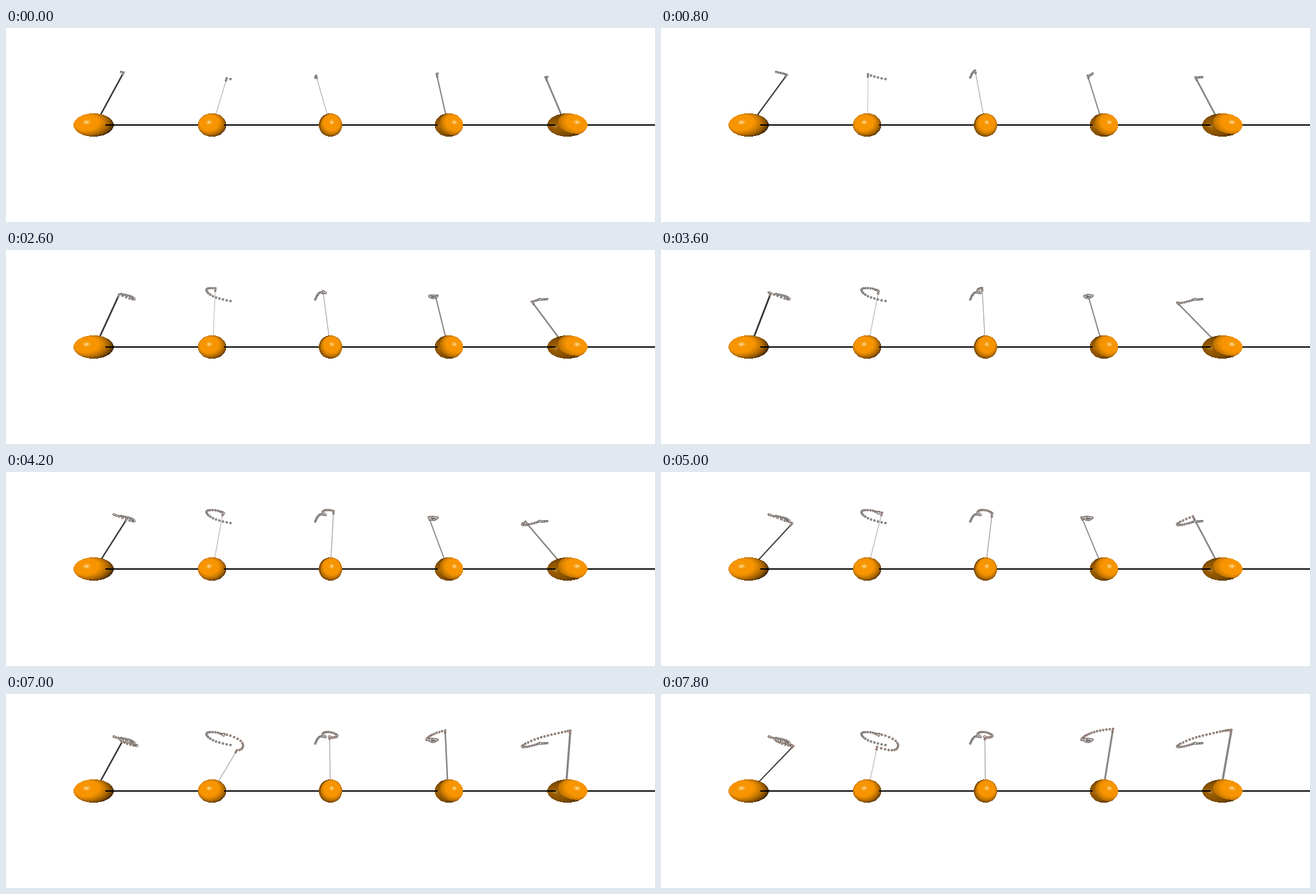
A matplotlib script for the animation above (8 s loop, 1000x300 px).

```python
import numpy as np
import matplotlib.pyplot as plt
from matplotlib.animation import FuncAnimation

W, H, DPI = 1000, 300, 100
FRAMES, INTERVAL = 40, 200
PX = 72 / DPI
MID, RADIUS, GAP = 150, 18, 182.5
STRIDE = 5  # steps between two waypoints of a tip

# tip waypoints, shaft colour, shaft width at the leftmost and rightmost tip
ARROWS = [
    ([(177.5, 68), (194, 72.5), (194.5, 76), (170, 67.3), (173.5, 68.2),
      (201.5, 79), (187, 77), (177.5, 70.5), (204, 80.5)], "#383838", (2.8, 1.8)),
    ([(346, 79), (319, 71.5), (309.5, 60.5), (326.5, 60), (335.5, 64),
      (336.5, 62), (361.5, 72.5), (360, 86.5), (333, 82)], "#b4b4b4", (.7, 1.6)),
    ([(476.5, 76.5), (484, 66), (492.5, 66.5), (488, 62.3), (498, 58.8),
      (510.5, 64.5), (502, 67.5), (498.5, 65.8), (499, 66.5)], "#999999", (.9, 1.2)),
    ([(665, 70.5), (657.5, 74), (653, 70.8), (663, 70.8), (655.5, 69.5),
      (648.3, 70.8), (653.5, 65), (672, 57.5), (696.5, 54)], "#858585", (1.6, 2.8)),
    ([(834, 76), (823.5, 76.5), (822, 76.2), (806.5, 81), (795.5, 80.5),
      (814.5, 70.5), (840.5, 63), (866, 57.3), (879, 55.5)], "#858585", (2.2, 3.3)),
]


def glide(points):
    """Natural cubic spline through the waypoints, sampled once per step."""
    p = np.array(points, float)
    n = len(p)
    system = 4 * np.eye(n) + np.eye(n, k=1) + np.eye(n, k=-1)
    system[0, 0] = system[-1, -1] = 2
    ahead, behind = np.vstack([p[1:], p[-1:]]), np.vstack([p[:1], p[:-1]])
    slope = np.linalg.solve(system, 3 * (ahead - behind))
    t = np.arange(FRAMES + 1) / STRIDE
    i = np.minimum(t.astype(int), n - 2)
    u = (t - i)[:, None]
    return ((2*u**3 - 3*u**2 + 1) * p[i] + (u**3 - 2*u**2 + u) * slope[i]
            + (3*u**2 - 2*u**3) * p[i + 1] + (u**3 - u**2) * slope[i + 1])


def unit(x, y):
    return np.array([x, y, np.sqrt(1 - x*x - y*y)])


class Atom:
    """Ball in place k of the row, counted from the middle, seen in perspective."""

    def __init__(self, k):
        self.k = k
        self.x = 500 + GAP * k
        self.rx = RADIUS * np.sqrt(1 + .49 * k * k)
        self.foot = np.array([self.x - .2 - 1.2 * k, MID])
        self.left = self.x - (self.rx if k < 0 else RADIUS)
        self.right = self.x + (self.rx if k > 0 else RADIUS)

    def paint(self, img):
        yy, xx = np.mgrid[0:H, 0:W] + .5
        nx, ny = (xx - self.x) / self.rx, (yy - MID) / RADIUS
        inside = nx**2 + ny**2 <= 1
        nx, ny = nx[inside], ny[inside]
        normal = np.stack([nx, ny, np.sqrt(1 - nx**2 - ny**2)], axis=1)

        spot = (2 + 6.5 * self.k) / self.rx
        shade = np.clip(.45 + .7 * normal @ unit(1.3 * spot, -.25), .1, .97)
        gloss = .75 * np.clip(normal @ unit(spot, -.24), 0, 1)**90
        if self.k >= 0:  # the far side only gets a weak light from the left
            dark = np.hypot(nx - .15 - .19 * self.k, ny + .12 * self.k) > 1
            glint = np.clip(normal @ unit(-.6, .1), 0, 1)
            shade = np.where(dark, .33 + .27 * glint, shade)
            gloss = np.where(dark, .25 * glint**90, gloss)
        rgb = np.array([1, .6, 0]) * shade[:, None]
        rgb += (np.array([1, .93, .75]) - rgb) * gloss[:, None]
        img[inside] = np.column_stack([rgb, np.ones(len(rgb))])


fig = plt.figure(figsize=(W / DPI, H / DPI), dpi=DPI, facecolor="white")
ax = fig.add_axes([0, 0, 1, 1])
ax.set_xlim(0, W)
ax.set_ylim(H, 0)
ax.axis("off")

atoms = [Atom(k) for k in range(-2, 3)]
picture = np.zeros((H, W, 4))
for atom in atoms:
    atom.paint(picture)
ax.imshow(picture, extent=(0, W, H, 0), interpolation="nearest", aspect="auto", zorder=3)

ends = [atom.left for atom in atoms[1:]] + [W]
for atom, end in zip(atoms, ends):
    ax.plot([atom.right, end], [MID, MID], color="black", lw=2 * PX,
            solid_capstyle="butt", zorder=4)

trails = [glide(points) for points, _, _ in ARROWS]
shafts = [ax.plot([], [], color=color, solid_capstyle="butt", zorder=1)[0]
          for _, color, _ in ARROWS]
beads = ax.scatter([], [], s=(3.7 * PX)**2, linewidths=0, zorder=5)
glints = ax.scatter([], [], s=(1.6 * PX)**2, color="#d4d0ce", linewidths=0, zorder=6)

age = np.linspace(0, 1, FRAMES + 1)[:, None]
TINT = np.array([.38, .38, .38]) * (1 - age) + np.array([.46, .35, .30]) * age


def draw(frame):
    seen = frame + 2
    spots, tints = [], []
    for atom, trail, shaft, (_, _, widths) in zip(atoms, trails, shafts, ARROWS):
        tip = trail[seen - 1]
        down = (atom.foot - tip) / np.hypot(*(atom.foot - tip))
        neck = tip + 3.6 * down
        shaft.set_data(*zip(atom.foot, neck))
        reach = trail[:, 0].min(), trail[:, 0].max()
        shaft.set_linewidth(PX * np.interp(tip[0], reach, widths))
        spots += [trail[:seen], neck[None]]
        tints += [TINT[:seen], TINT[seen - 1:seen]]
    spots = np.concatenate(spots)
    beads.set_offsets(spots)
    beads.set_facecolor(np.concatenate(tints))
    glints.set_offsets(spots + (-.3, -.5))
    return [*shafts, beads, glints]


anim = FuncAnimation(fig, draw, frames=FRAMES, interval=INTERVAL, repeat=True,
                     repeat_delay=0, blit=False)
plt.show()
```
